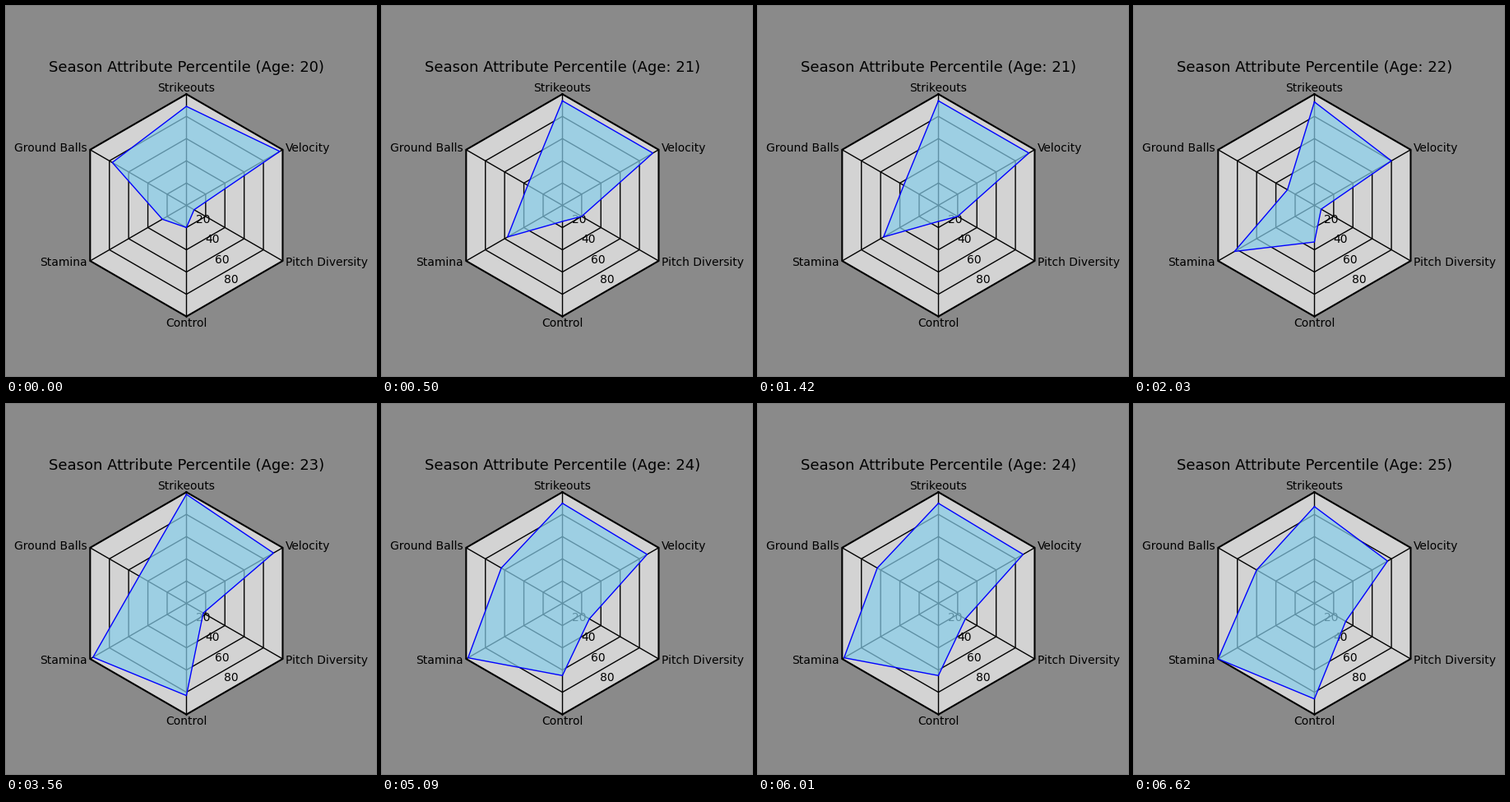
A matplotlib script for the animation above (8000 ms loop, 450 px wide and 450 px high).

```python
import numpy as np
import matplotlib.pyplot as plt
from matplotlib.animation import FuncAnimation
from matplotlib.patches import Polygon

SIZE, DPI = 450, 100
LOOP, STEP = 8000, 20
FIRST_HOLD, HOLD = 500, 1530
FIRST_AGE = 20
CX, CY, R = 219.4, 242.4, 135.2

# Percentiles per season, clockwise from the top
SEASONS = [
    (89, 97, 8, 20, 25, 77),
    (94, 94, 20, 14.5, 57, 36),
    (93, 80, 7, 33, 83, 28),
    (98, 90.5, 17.5, 83, 97, 49),
    (90, 88, 28, 65, 98, 63.5),
    (87, 76, 32.5, 86, 100, 60),
]

# text, x, baseline y, alignment
LABELS = [
    ("Strikeouts", CX, 104.4, "center"),
    ("Velocity", 340, 177.4, "left"),
    ("Pitch Diversity", 340, 316.4, "left"),
    ("Control", CX, 389.6, "center"),
    ("Stamina", 98.9, 316.4, "right"),
    ("Ground Balls", 98.9, 177.4, "right"),
]

ANGLES = np.radians(np.arange(0, 360, 60))


def place(values, angles=ANGLES):
    """Percentiles at clockwise angles -> stage pixels."""
    r = np.asarray(values) / 100 * R
    return np.column_stack([CX + r * np.sin(angles), CY - r * np.cos(angles)])


def ring(value):
    return place(np.full(6, value))


def closed(points):
    return np.vstack([points, points[:1]])


fig = plt.figure(figsize=(SIZE / DPI, SIZE / DPI), dpi=DPI, facecolor="#8a8a8a")
ax = fig.add_axes([0, 0, 1, 1])
ax.set(xlim=(0, SIZE), ylim=(SIZE, 0))
ax.axis("off")
plt.rcParams["font.family"] = "DejaVu Sans"

ax.add_patch(Polygon(ring(100), facecolor="lightgray", edgecolor="none", zorder=0))
for x, y in ring(100):
    ax.plot([CX, x], [CY, y], color="black", lw=1, zorder=1)
for value in (20, 40, 60, 80):
    ax.plot(*closed(ring(value)).T, color="black", lw=1, zorder=1)
    x, y = place([value], np.radians([155]))[0]
    ax.text(x, y, str(value), fontsize=10, ha="left", va="bottom", zorder=2)
ax.plot(*closed(ring(100)).T, color="black", lw=1.5, zorder=2)

for text, x, y, align in LABELS:
    ax.text(x, y, text, fontsize=10, ha=align, va="baseline", zorder=6)
title = ax.text(CX, 80, "", fontsize=13, ha="center", va="baseline", zorder=6)

area = ax.add_patch(Polygon(ring(0), facecolor="skyblue", edgecolor="none",
                            alpha=0.7, zorder=3))
outline, = ax.plot([], [], color="blue", lw=1, zorder=4)


def update(i):
    t = i * STEP + STEP / 2
    season = 0 if t < FIRST_HOLD else 1 + int((t - FIRST_HOLD) // HOLD)
    season = min(season, len(SEASONS) - 1)
    points = place(SEASONS[season])
    area.set_xy(points)
    outline.set_data(*closed(points).T)
    title.set_text(f"Season Attribute Percentile (Age: {FIRST_AGE + season})")
    return area, outline, title


anim = FuncAnimation(fig, update, frames=LOOP // STEP, interval=STEP,
                     repeat=True, repeat_delay=0)
plt.show()
```
